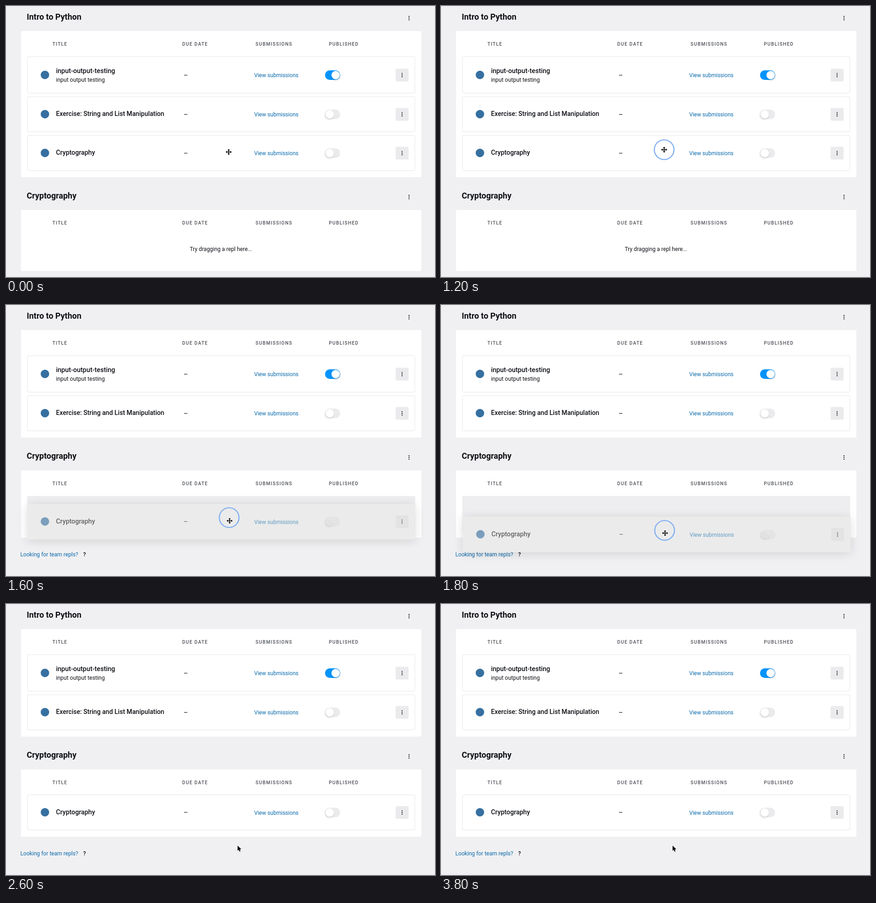
These frames come from a looping animation (942 px wide and 594 px high, 4 s). An HTML page with a canvas:

```html
<!DOCTYPE html>
<html lang="en">
<head>
<meta charset="utf-8">
<title>Drag an exercise between groups</title>
<style>
html, body { margin: 0; width: 942px; height: 594px; overflow: hidden; background: #f0f0f2; }
canvas { display: block; }
</style>
</head>
<body>
<canvas id="stage" width="942" height="594"></canvas>
<script>
const ctx = document.getElementById('stage').getContext('2d');
const LOOP = 4000, STEP = 200;
const INK = '#0e1015', GREY = '#4d5056', LINK = '#0b6aab', PAGE = '#f0f0f2';
const RESTING = { button: '#ebebed', track: '#ebebed', knob: '#fff' };
const HELD = { button: '#dedede', track: '#e0e0e0', knob: '#ededed' };

// [time, x, y]
const CURSOR = [
  [0, 489, 320], [400, 489, 320], [1000, 490, 315], [1200, 490, 315], [1400, 488, 349],
  [1600, 491, 473], [1800, 492, 500], [2000, 492, 500], [2200, 496, 510],
  [2400, 502, 522], [2600, 508, 529]
];
const RING = [
  [1200, 490, 315], [1400, 488, 347.5], [1600, 490, 466], [1800, 491, 494], [2000, 492, 501]
];

function at(path, t) {
  const i = path.findIndex(p => p[0] > t);
  if (i < 0) return path[path.length - 1].slice(1);
  if (i === 0) return path[0].slice(1);
  const a = path[i - 1], b = path[i], k = (t - a[0]) / (b[0] - a[0]);
  return [a[1] + (b[1] - a[1]) * k, a[2] + (b[2] - a[2]) * k];
}

function text(str, x, y, size, color = INK, weight = 400, spacing = 0) {
  ctx.font = `${weight} ${size}px Roboto, "Open Sans", sans-serif`;
  ctx.letterSpacing = spacing + 'px';
  ctx.fillStyle = color;
  ctx.fillText(str, x, y);
}

function box(x, y, w, h, r, fill, stroke) {
  ctx.beginPath();
  ctx.roundRect(x, y, w, h, r);
  if (fill) { ctx.fillStyle = fill; ctx.fill(); }
  if (stroke) { ctx.strokeStyle = stroke; ctx.lineWidth = 1.4; ctx.stroke(); }
}

function disc(x, y, r, fill) {
  ctx.beginPath();
  ctx.arc(x, y, r, 0, Math.PI * 2);
  ctx.fillStyle = fill;
  ctx.fill();
}

function kebab(x, y) {
  for (const d of [-3.7, 0, 3.7]) disc(x, y + d, 1.15, INK);
}

function withShadow(color, blur, dx, dy, draw) {
  ctx.save();
  ctx.shadowColor = color;
  ctx.shadowBlur = blur;
  ctx.shadowOffsetX = dx;
  ctx.shadowOffsetY = dy;
  draw();
  ctx.restore();
}

function toggle(y, on, skin) {
  box(700.5, y - 10.5, 33.2, 21, 10.5, on ? '#0094fb' : skin.track);
  const x = on ? 723.8 : 710.8;
  withShadow('rgba(0,0,0,.16)', 4, on ? 1 : -1, 2, () => disc(x, y, 9.2, skin.knob));
}

function panel(title, top, bottom) {
  text(title, 45.5, top - 25.3, 18, INK, 700);
  kebab(885, top - 28.3);
  box(33, top, 879, bottom - top, 2, '#fff');
  const label = (s, x) => text(s, x, top + 32, 10.2, GREY, 500, 1.3);
  label('TITLE', 102);
  label('DUE DATE', 387);
  label('SUBMISSIONS', 548);
  label('PUBLISHED', 709);
}

function content(row, y, skin) {
  disc(85.5, y - .5, 9.3, '#3670a0');
  text(row.title, 109.7, y + (row.note ? -5 : 3.6), row.size, INK, 500);
  if (row.note) text(row.note, 109.7, y + 14.8, 12.35);
  text('–', 389.7, y + 5.2, 15);
  text('View submissions', 545, y + 4.6, 12.05, LINK);
  toggle(y, row.on, skin);
  box(855.5, y - 14, 28.5, 28, 3, skin.button);
  kebab(869.7, y);
}

function card(row, y) {
  const h = row.note ? 80 : 77;
  box(47.2, y - (row.note ? 40.5 : 38.7), 850.6, h, 3, '#fff', '#eeeef1');
  content(row, y, RESTING);
}

function slot(y) {
  box(46.5, y, 852, 78, 3, '#eeeef0');
}

function dragged(row, dx, y) {
  ctx.save();
  ctx.translate(dx, 0);
  withShadow('rgba(0,0,0,.13)', 22, 0, 3, () => box(46.5, y - 39, 852, 78, 4, '#ebebeb'));
  ctx.globalAlpha = .62;
  content(row, y, HELD);
  ctx.restore();
}

function poly(points) {
  ctx.beginPath();
  points.forEach(([x, y]) => ctx.lineTo(x, y));
  ctx.closePath();
}

function outlined() {
  ctx.lineJoin = 'round';
  ctx.strokeStyle = '#fff';
  ctx.lineWidth = 2;
  ctx.stroke();
  ctx.fillStyle = '#000';
  ctx.fill();
}

function moveCursor(x, y) {
  const pts = [];
  const arm = [[-.8, -.8], [-.8, -3.6], [-2.8, -3.6], [0, -6.6], [2.8, -3.6], [.8, -3.6]];
  for (let q = 0; q < 4; q++) {
    const c = Math.round(Math.cos(q * Math.PI / 2)), s = Math.round(Math.sin(q * Math.PI / 2));
    for (const [a, b] of arm) pts.push([x + a * c - b * s, y + a * s + b * c]);
  }
  poly(pts);
  outlined();
}

function pointer(x, y) {
  const shape = [[0, 0], [0, 11.6], [2.6, 9.2], [4.5, 13.4], [6.5, 12.5], [4.7, 8.4], [8.3, 8.2]];
  poly(shape.map(([a, b]) => [x + .5 + a, y + .5 + b]));
  outlined();
}

function ring(x, y, released) {
  ctx.beginPath();
  ctx.arc(x, y, released ? 25.2 : 21.6, 0, Math.PI * 2);
  ctx.strokeStyle = released ? '#8fbaec' : '#80aff2';
  ctx.lineWidth = released ? 1.6 : 2.4;
  ctx.stroke();
}

const FIRST = { title: 'input-output-testing', note: 'input output testing', size: 14.55, on: true };
const SECOND = { title: 'Exercise: String and List Manipulation', size: 14.1 };
const THIRD = { title: 'Cryptography', size: 14.3 };

function render(t) {
  const moved = t >= 1600, holding = t >= 1400 && t < 2000, pressed = t >= 1200 && t <= 2000;
  const top = moved ? 362.5 : 447;
  const [rx, ry] = at(RING, t);

  ctx.fillStyle = PAGE;
  ctx.fillRect(0, 0, 942, 594);
  panel('Intro to Python', 55, moved ? 290.5 : 375);
  panel('Cryptography', top, moved ? 510 : 581);
  card(FIRST, 151.5);
  card(SECOND, 237.5);

  if (moved) {
    text('Looking for team repls?', 31.5, 551, 12.12, LINK);
    text('?', 169.5, 551, 12, INK, 500);
  } else {
    if (holding) box(46.5, 496, 852, 71.5, 3, '#d2edff');
    text('Try dragging a repl here...', 403.5, 536.5, 12.2);
  }

  if (holding) {
    slot(moved ? 418.5 : 283.5);
    dragged(THIRD, rx - 490, ry + 9);
  } else {
    card(THIRD, moved ? 457 : 322.5);
  }

  if (pressed) ring(rx, ry, t === 2000);
  (t < 2000 ? moveCursor : pointer)(...at(CURSOR, t));
}

function tick(now) {
  const t = now % LOOP;
  render(Math.floor(t / STEP) * STEP);
  requestAnimationFrame(tick);
}
render(0);
requestAnimationFrame(tick);
</script>
</body>
</html>
```
